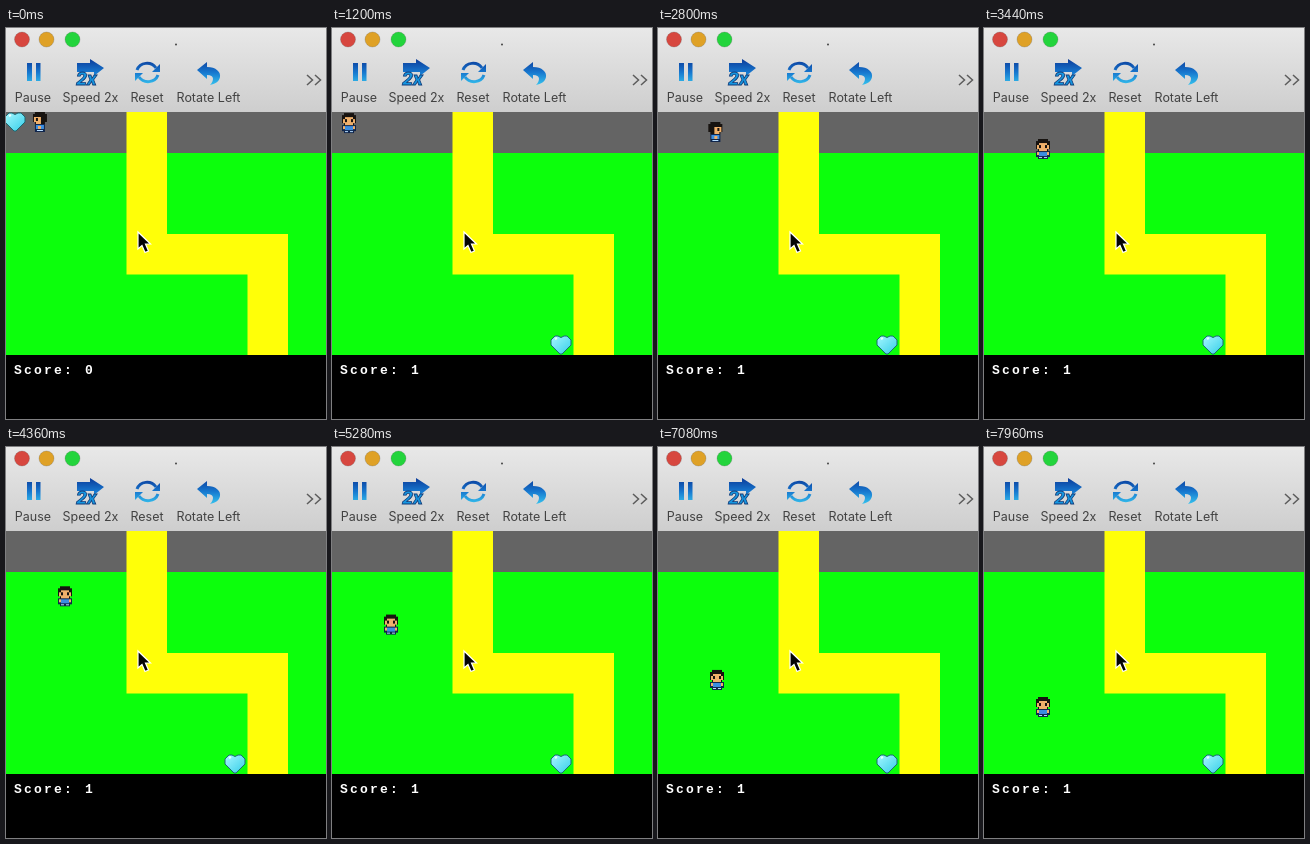
An HTML page for the animation above (8 s loop, 320x391 px).

```html
<!DOCTYPE html>
<html lang="en">
<head>
<meta charset="utf-8">
<title>Path game</title>
<style>
html, body { margin: 0; width: 100%; height: 100%; overflow: hidden; background: #000; }
svg { display: block; width: 100%; height: 100%; }
.label { font: 12.5px Inter, sans-serif; fill: #424242; text-anchor: middle; }
.score { font: bold 13px "Liberation Mono", monospace; letter-spacing: 2.2px; fill: #fff; white-space: pre; }
.pixel { shape-rendering: crispEdges; }

#player { animation: walk 8s linear infinite; }
@keyframes walk {
  0% { transform: translate(34px, 94px); }
  7%, 14.6% { transform: translate(17px, 94px); }
  18.4% { transform: translate(17px, 104px); }
  35.7%, 36.1% { transform: translate(59px, 104px); }
  100% { transform: translate(59px, 261.2px); }
}
#front { animation: front 8s step-end infinite; }
#side { animation: side 8s step-end infinite; }
@keyframes front {
  0%, 18.4% { opacity: 0; }
  14.6%, 36% { opacity: 1; }
}
@keyframes side {
  0% { opacity: 1; transform: scaleX(-1); }
  14.6%, 36% { opacity: 0; transform: none; }
  18.4% { opacity: 1; transform: none; }
}
#gem { animation: gem 8s step-end infinite; }
@keyframes gem {
  0% { transform: translate(9px, 94px); }
  3.5%, 100% { transform: translate(229px, 317px); }
}
.before { animation: before 8s step-end infinite; }
.after { animation: after 8s step-end infinite; }
@keyframes before { 0% { opacity: 1; } 3.5%, 100% { opacity: 0; } }
@keyframes after { 0% { opacity: 0; } 3.5%, 100% { opacity: 1; } }
</style>
</head>
<body>
<svg viewBox="0 0 320 391">
  <defs>
    <linearGradient id="bar" x2="0" y2="1">
      <stop stop-color="#e8e8e8"/><stop offset="1" stop-color="#cecece"/>
    </linearGradient>
    <linearGradient id="blue" gradientUnits="userSpaceOnUse" x1="0" y1="32" x2="0" y2="57">
      <stop stop-color="#0c3f9d"/><stop offset=".5" stop-color="#1778cf"/><stop offset="1" stop-color="#36c2ee"/>
    </linearGradient>
    <linearGradient id="ice" x2="1" y2="1">
      <stop stop-color="#a5f7ff"/><stop offset="1" stop-color="#35cde8"/>
    </linearGradient>
  </defs>

  <!-- Window toolbar -->
  <rect width="320" height="84" fill="url(#bar)"/>
  <g stroke-opacity=".35" stroke="#555" stroke-width=".7">
    <circle cx="16" cy="11.5" r="7.5" fill="#d7473f"/>
    <circle cx="40.5" cy="11.5" r="7.5" fill="#dfa126"/>
    <circle cx="66.5" cy="11.5" r="7.5" fill="#23d43c"/>
  </g>
  <circle cx="170" cy="16.5" r="1" fill="#444"/>
  <g fill="url(#blue)">
    <path d="M21 35h5v18h-5zM30 35h4.500v18H30z"/>
    <path d="M71 35h13v-4l14 9-10 8v-4H71z"/>
    <path d="M191 42l10-8v5c9 0 14 5 13 10-1 5-5 7-10 8 4-4 5-10-3-10v4z"/>
  </g>
  <text x="70" y="57" font-family="Inter, sans-serif" font-size="17" font-weight="800" font-style="italic"
    fill="#1596e0" stroke="#123b78" stroke-width=".8">2x</text>
  <g fill="none" stroke="url(#blue)" stroke-width="3">
    <path d="M131 42c3-8 14-9 19-2"/>
    <path d="M152 47c-3 8-14 9-19 2"/>
  </g>
  <path d="M154 36v8h-8zM129 53v-8h8z" fill="url(#blue)"/>
  <g class="label">
    <text x="27" y="74">Pause</text>
    <text x="84.500" y="74">Speed 2x</text>
    <text x="141" y="74">Reset</text>
    <text x="202.500" y="74">Rotate Left</text>
  </g>
  <path d="M301 47l5.500 5-5.500 5M309 47l5.500 5-5.500 5" fill="none" stroke="#5c5c5c" stroke-width="1.500"/>

  <!-- Board -->
  <rect y="84" width="320" height="41" fill="#646464"/>
  <rect y="125" width="320" height="202" fill="#0cff0c"/>
  <path d="M120.500 84H161V206H282V327H241.500V246.500H120.500z" fill="#ffff08"/>
  <rect y="327" width="320" height="64"/>
  <g class="score">
    <text x="8" y="346">Score:</text>
    <text class="before" x="79" y="346">0</text>
    <text class="after" x="79" y="346">1</text>
  </g>

  <g id="gem">
    <path d="M-6-9h3l3 1.500L3-9h3l4 4v5L1 9h-2l-9-9v-5z" fill="url(#ice)" stroke="#1c6873"/>
    <path d="M-6-6l2-1" stroke="#e8ffff" stroke-width="2"/>
  </g>

  <g id="player" class="pixel">
    <g id="front">
      <path d="M-5-10H5v2h2v8H5v2H-5V0h-2v-8h2z" fill="#171310"/>
      <path d="M-4-6h8v2h2v4H4v2h-8V0h-2v-4h2z" fill="#f0b06b"/>
      <path d="M-4-4h2v3h-2zM2-4h2v3H2z" fill="#171310"/>
      <path d="M-7 2H7v6H5v2H-5V8h-2z" fill="#10264c"/>
      <path d="M-4 3h8v4h-8z" fill="#3c8de0"/>
      <path d="M-6 3h2v3h-2zM4 3h2v3H4z" fill="#f0b06b"/>
      <path d="M-4 8h3v1h-3zM1 8h3v1H1z" fill="#b5dcff"/>
    </g>
    <g id="side">
      <path d="M-5-10H5v2h2v8H5v2H-5V0h-2v-8h2z" fill="#171310"/>
      <path d="M-1-5h7v5H4v2h-5z" fill="#f0b06b"/>
      <path d="M2-4h2v3H2z" fill="#171310"/>
      <path d="M-5 2H5v8H-5z" fill="#10264c"/>
      <path d="M-4 3h8v4h-8z" fill="#3c8de0"/>
      <path d="M-1 4h3v3h-3z" fill="#f0b06b"/>
      <path d="M-3 8h6v1h-6z" fill="#b5dcff"/>
    </g>
  </g>

  <path d="M132 204v17l4-3.500 3 7 3.500-1.500-3-7h5z" fill="#050505" stroke="#fff" stroke-width="1.200"/>
</svg>
</body>
</html>
```
